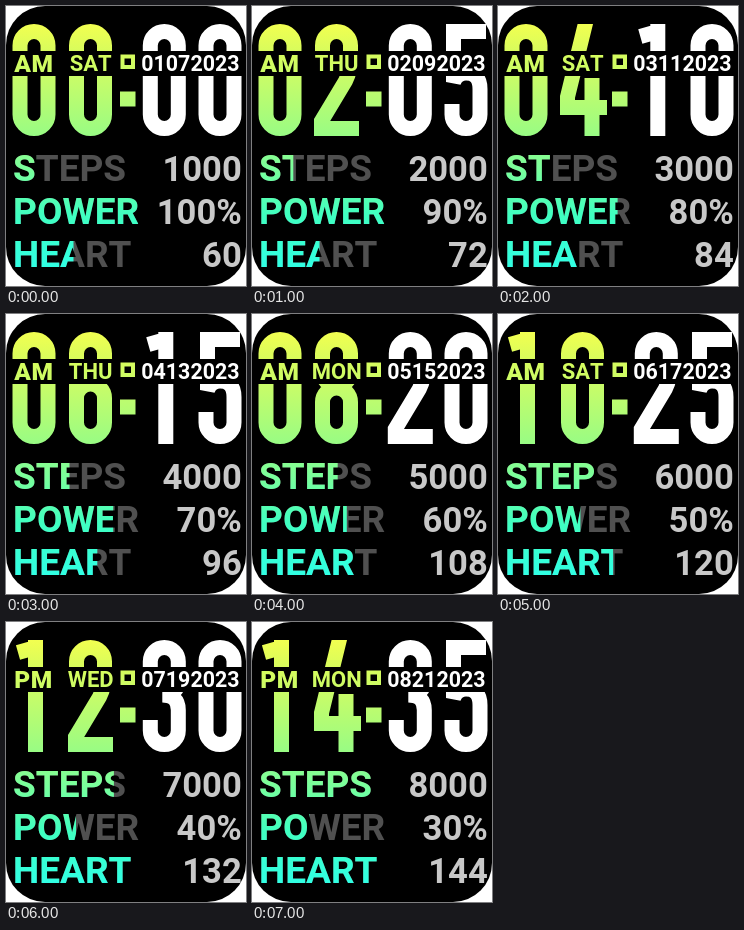
An HTML page that plays this animation: 240 by 280 pixels, repeating every 8 s.

```html
<!DOCTYPE html>
<html lang="en">
<head>
<meta charset="utf-8">
<title>Watch face</title>
<style>
  html, body { margin: 0; width: 100%; height: 100%; overflow: hidden; background: #fff; }
  svg { display: block; width: 240px; height: 280px; }
  text { font-family: Roboto, sans-serif; font-weight: 700; font-kerning: none; }
  .digit { fill: none; stroke-width: 15; stroke-linejoin: miter; }
  .tint { fill: url(#tint); }
  .tint-line { stroke: url(#tint); }
  .white-line { stroke: #fff; }
  .label { font-size: 37px; }
  .value { font-size: 34.6px; fill: #c8c8c8; text-anchor: end; }
  .day { font-size: 22px; text-anchor: middle; }
  .half { font-size: 24.5px; font-weight: 900; letter-spacing: .5px; }
  .date { font-size: 21.4px; fill: #fff; }
</style>
</head>
<body>
<svg viewBox="0 0 240 280">
  <defs>
    <linearGradient id="tint" gradientUnits="userSpaceOnUse" x1="0" y1="18" x2="0" y2="262">
      <stop offset="0" stop-color="#f2ff50"/>
      <stop offset=".11" stop-color="#d8fc5c"/>
      <stop offset=".22" stop-color="#c8fc68"/>
      <stop offset=".46" stop-color="#98fc84"/>
      <stop offset=".6" stop-color="#78ff9c"/>
      <stop offset=".78" stop-color="#40ffc0"/>
      <stop offset="1" stop-color="#30ffe4"/>
    </linearGradient>
    <clipPath id="band"><rect y="18" width="240" height="112"/></clipPath>
  </defs>
  <rect width="240" height="280" rx="39"/>
  <g id="clock" clip-path="url(#band)"></g>
  <path d="M0 45H240V70H0Z"/>
  <path class="tint" fill-rule="evenodd" d="M114.5 48.5h14.5v14.5h-14.5zm4 4v6.5h6.5v-6.5zM114 85.5h15.5v15h-15.5z"/>
  <text id="half" class="half tint" x="8.2" y="65.5"></text>
  <text id="day" class="day tint" x="84.7" y="65"></text>
  <text id="date" class="date" x="135.3" y="64.7"></text>
  <g id="rows"></g>
</svg>
<script>
  const NS = 'http://www.w3.org/2000/svg';
  const $ = id => document.getElementById(id);
  const DAYS = ['SUN', 'MON', 'TUE', 'WED', 'THU', 'FRI', 'SAT'];

  // Stroke centre lines in a cell 44 wide, from y = 18 to y = 130
  const GLYPHS = {
    0: 'M8 39.5a14 14 0 0 1 28 0V108.5a14 14 0 0 1-28 0Z',
    1: 'M6 30.5L23.5 25.5M23.5 18V130',
    2: 'M8 52V39.5a14 14 0 0 1 28 0V53Q36 65 31 75L7 115V122.5H44.5',
    3: 'M8 50V39.5a14 14 0 0 1 28 0V58Q36 73 20 73Q36 73 36 88V108.5a14 14 0 0 1-28 0V98',
    4: 'M27 9L7 91V101.5H46.5M31.5 72V130',
    5: 'M42 25.5H9.5V76Q13 67 22 67Q36 67 36 83V108.5a14 14 0 0 1-28 0V98',
    6: 'M36 50V39.5a14 14 0 0 0-28 0V108.5a14 14 0 0 0 28 0V84a14 14 0 0 0-28 0',
    8: 'M8 39.5a14 14 0 0 1 28 0V58a14 14 0 0 1-28 0ZM8 88a14 14 0 0 1 28 0V108.5a14 14 0 0 1-28 0Z'
  };

  function add(parent, tag, attrs, content = '') {
    const el = document.createElementNS(NS, tag);
    for (const name in attrs) el.setAttribute(name, attrs[name]);
    el.textContent = content;
    return parent.appendChild(el);
  }

  // The gradient moves with the cell, which leaves its vertical run unchanged
  const digits = [6, 62.5, 136.3, 192].map((x, i) => add($('clock'), 'path', {
    class: 'digit ' + (i < 2 ? 'tint-line' : 'white-line'),
    transform: `translate(${x})`
  }));

  // level: filled tenths of the label at second k
  const rows = [
    { name: 'STEPS', unit: 11.1, value: k => 1000 * (k + 1), level: k => Math.round(2 + k * 8 / 7) },
    { name: 'POWER', unit: 12.4, value: k => 100 - 10 * k + '%', level: k => Math.min(10, 11 - k) },
    { name: 'HEART', unit: 11.9, value: k => 60 + 12 * k, level: k => Math.max(5, Math.min(10, k + 4)) }
  ];

  rows.forEach((row, i) => {
    const name = row.name, y = 174.6 + 43 * i;
    const clip = add($('rows'), 'clipPath', { id: name });
    row.bar = add(clip, 'rect', { x: 0, y: y - 32, height: 38 });
    add($('rows'), 'text', { class: 'label', x: 7, y, fill: '#505050' }, name);
    add($('rows'), 'text', { class: 'label tint', x: 7, y, 'clip-path': `url(#${name})` }, name);
    row.text = add($('rows'), 'text', { class: 'value', x: 235.8, y });
  });

  const two = n => String(n).padStart(2, '0');

  function show(k) {
    const hour = 2 * k, month = k + 1, date = 7 + 2 * k;
    [...two(hour) + two(5 * k)].forEach((c, i) => digits[i].setAttribute('d', GLYPHS[c]));
    $('half').textContent = hour < 12 ? 'AM' : 'PM';
    $('day').textContent = DAYS[new Date(2023, k, date).getDay()];
    $('date').textContent = two(month) + two(date) + '2023';
    for (const row of rows) {
      row.bar.setAttribute('width', 8 + row.unit * row.level(k));
      row.text.textContent = row.value(k);
    }
  }

  const start = performance.now();
  let shown = -1;
  function tick() {
    const k = Math.floor((performance.now() - start) / 1000) % 8;
    if (k !== shown) show(shown = k);
    requestAnimationFrame(tick);
  }
  tick();
</script>
</body>
</html>
```
